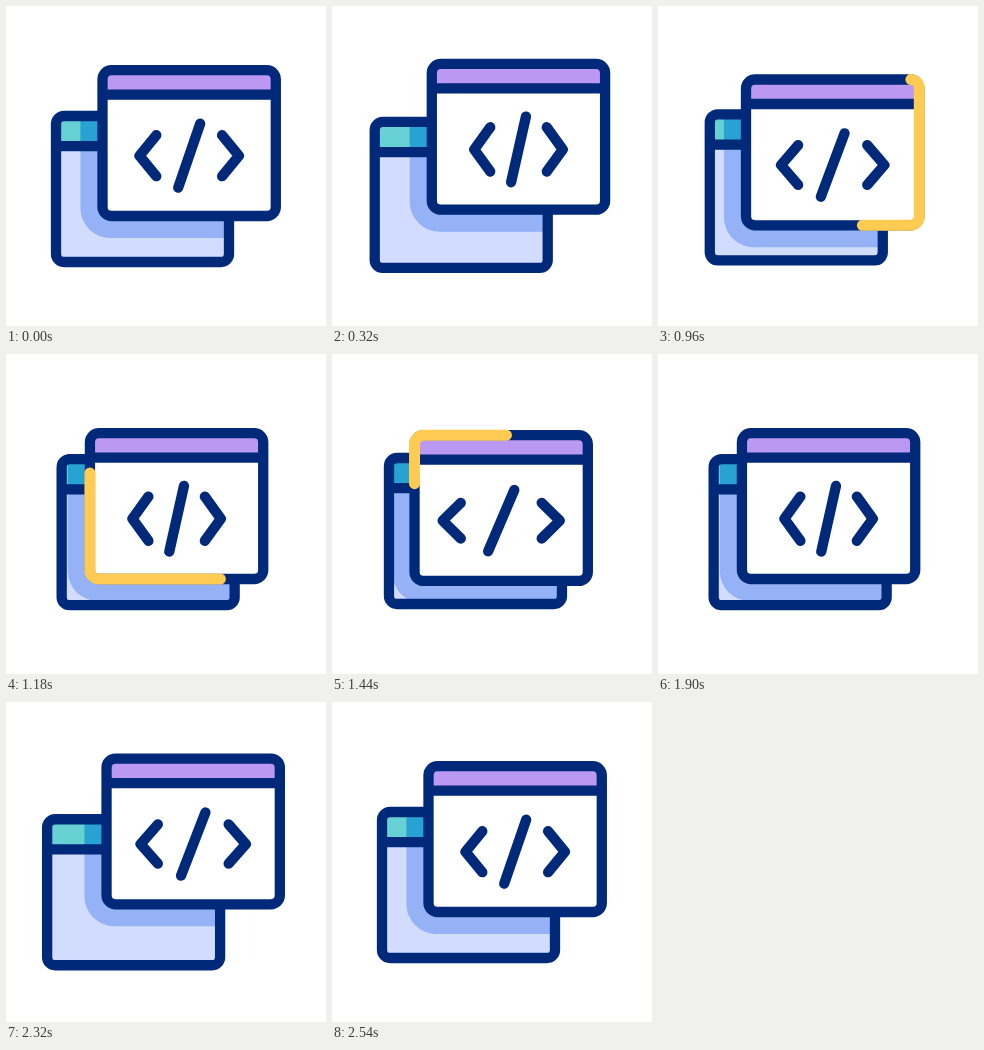
Animation of 320 by 320 pixels, one loop 2.8 s. Source, as an HTML page:

```html
<!DOCTYPE html>
<html lang="en">
<head>
<meta charset="utf-8">
<title>Code windows</title>
<style>
  html, body { margin: 0; width: 100%; height: 100%; overflow: hidden; background: #fff; }
  svg { display: block; width: 100vw; height: 100vh; }
  .line { fill: none; stroke: #00297a; stroke-width: 10.3; stroke-linecap: round; stroke-linejoin: round; }
  #glow { stroke: #ffcb52; stroke-width: 11; }
</style>
</head>
<body>
<svg viewBox="0 0 320 320">
  <defs>
    <clipPath id="pane"><rect id="paneBox" x="50" y="110" width="173" height="146" rx="8"/></clipPath>
    <path id="shade" d="M74.4 0V202a30 30 0 0 0 30 30H320V0Z"/>
    <clipPath id="shadeClip"><use id="shadeBox" href="#shade"/></clipPath>
  </defs>
  <g clip-path="url(#pane)">
    <rect width="320" height="320" fill="#d2dcff"/>
    <use id="shadow" href="#shade" fill="#94b2f5"/>
    <rect class="bar" width="320" height="30" fill="#66d0d2"/>
    <g clip-path="url(#shadeClip)"><rect class="bar" width="320" height="30" fill="#28a2d2"/></g>
  </g>
  <g id="back" class="line">
    <rect x="50" y="110" width="173" height="146" rx="8"/>
    <path d="M52 140.2H221"/>
  </g>
  <g id="front">
    <rect x="96.5" y="64.2" width="173.3" height="145.8" rx="9" fill="#fff"/>
    <path d="M96.5 88V73a9 9 0 0 1 9-9H260.5a9 9 0 0 1 9 9V88Z" fill="#bb98f2"/>
    <path class="line" d="M99 88.7H267"/>
    <rect class="line" x="96.5" y="64.2" width="173.3" height="145.8" rx="9"/>
    <rect class="line" id="glow" x="96.5" y="64.2" width="173.3" height="145.8" rx="9" pathLength="620"/>
    <path class="line" id="code"/>
  </g>
</svg>
<script>
const LOOP = 2800, PERIMETER = 620;
const $ = id => document.getElementById(id);
const mix = (a, b, p) => a + (b - a) * p;
const ease = p => (1 - Math.cos(Math.PI * p)) / 2;
const phase = (t, a, b) => Math.min(1, Math.max(0, (t - a) / (b - a)));
const ramp = (t, a, b) => ease(phase(t, a, b));
const move = (el, x, y) => el.setAttribute('transform', `translate(${x} ${y})`);

const spreadKeys = [[200, 0], [330, -5.5], [750, 9], [1180, -5.5], [1480, 9.5],
                    [1890, -5.5], [2300, 3], [2540, 0]];

function track(keys, t) {
  let v = keys[0][1];
  for (let i = 1; i < keys.length; i++) {
    v = mix(v, keys[i][1], ramp(t, keys[i - 1][0], keys[i][0]));
  }
  return v;
}

function drawWindows(t) {
  const away = ramp(t, 200, 400) - ramp(t, 2232, 2540);
  // Closing settles slowly; opening is quick and even.
  const close = ease(1 - (1 - phase(t, 400, 1540)) ** 1.5) - ramp(t, 1830, 2232);
  const fx = away * mix(5, -14, close), fy = away * mix(-9.5, 17, close);
  const bx = away * mix(-11, 7, close), by = away * mix(9, -6, close);
  for (const id of ['front', 'shadow', 'shadeBox']) move($(id), fx, fy);
  for (const id of ['back', 'paneBox']) move($(id), bx, by);
  for (const bar of document.querySelectorAll('.bar')) bar.setAttribute('y', 110 + by);
}

function drawCode(t) {
  const e = track(spreadKeys, t);
  const cx = 183.2, cy = 149.7;
  const tip = 49.7 + e, inner = tip - 16.8 - 0.15 * e, h = 20.5 - 0.3 * e;
  const sx = (22 + e - 0.06 * e * e) / 2, sy = 32 - 0.15 * e;
  const bracket = s =>
    `M${cx + s * inner} ${cy - h}L${cx + s * tip} ${cy}L${cx + s * inner} ${cy + h}`;
  const slash = `M${cx + sx} ${cy - sy}L${cx - sx} ${cy + sy}`;
  $('code').setAttribute('d', bracket(-1) + slash + bracket(1));
}

function drawGlow(t) {
  const head = 700 * ramp(t, 445, 1470), tail = 705 * ramp(t, 590, 1800);
  const length = head - tail, glow = $('glow').style;
  glow.display = length > 0.5 ? '' : 'none';
  glow.strokeDasharray = `${length} ${PERIMETER - length}`;
  glow.strokeDashoffset = -(tail + 4);
}

function frame() {
  const t = performance.now() % LOOP;
  drawWindows(t);
  drawCode(t);
  drawGlow(t);
  requestAnimationFrame(frame);
}
frame();
</script>
</body>
</html>
```
